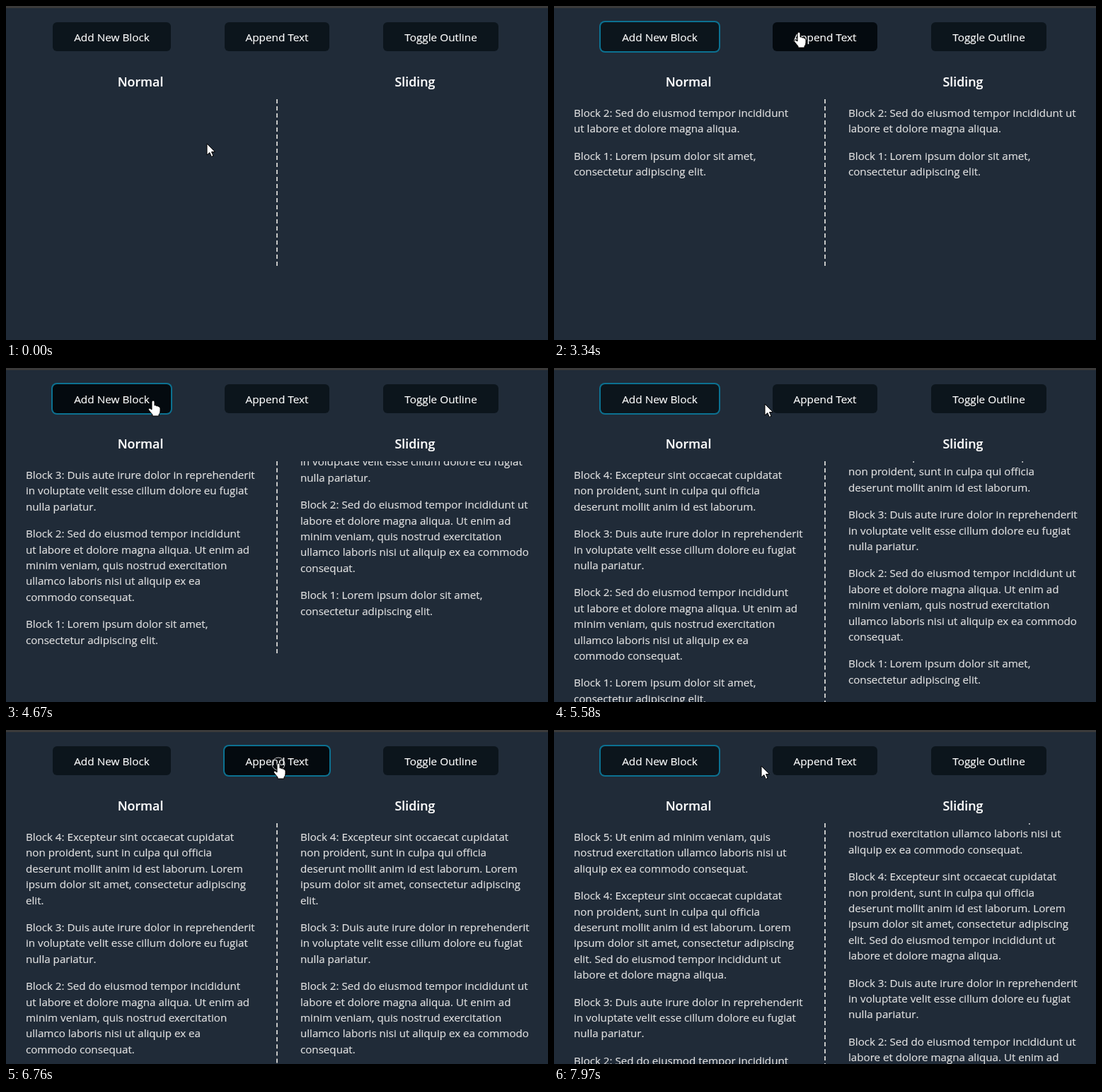
Write an HTML page that moves like this. It is 766x473 px and loops after 8000 ms.

```html
<!DOCTYPE html>
<html lang="en">
<head>
<meta charset="utf-8">
<title>Normal and sliding blocks</title>
<style>
  html, body { margin: 0; width: 100%; height: 100%; overflow: hidden; background: #202b38; }
  #stage {
    position: relative; width: 766px; height: 473px; overflow: hidden;
    background: #202b38; color: #e2e2e2;
    font: 15.15px/22.4px "Open Sans", "Noto Sans", sans-serif; white-space: nowrap;
    -webkit-text-stroke: 0.15px currentColor;
  }
  #stage > *, #inner { position: absolute; }
  .bar { top: 0; width: 100%; height: 3px; background: #3b3b3b; }
  .button {
    top: 23px; height: 41px; font-size: 15.35px; line-height: 42px; border-radius: 6px;
    background: #0c151c; color: #fff; text-align: center;
  }
  .button.hover { background: #040a0f; }
  .button.focus { box-shadow: 0 0 0 2px #0c7191; }
  .button.pressed { transform: translateY(2px); }
  h3 {
    top: 94px; width: 324px; margin: 0; text-align: center;
    font-size: 17.8px; font-weight: 600; line-height: 27px; color: #fff;
  }
  #normal {
    top: 132px; left: 0; width: 384px; min-height: 236px;
    box-sizing: border-box; padding-left: 28px; border-right: 2px dashed #c6c6c6;
  }
  #sliding { top: 132px; left: 416px; width: 350px; height: 341px; overflow: hidden; }
  p { margin: 0; padding: 8px 0; }
  #pointer { left: 0; top: 0; overflow: visible; }
  #pointer path { fill: #fff; stroke: #000; stroke-linejoin: round; }
</style>
</head>
<body>
<div id="stage">
  <div class="bar"></div>
  <div class="button" style="left:66px;width:167px">Add New Block</div>
  <div class="button" style="left:309px;width:148px">Append Text</div>
  <div class="button" style="left:533px;width:163px">Toggle Outline</div>
  <h3 style="left:28px">Normal</h3>
  <h3 style="left:416px">Sliding</h3>
  <div id="normal"></div>
  <div id="sliding"><div id="inner"></div></div>
  <svg id="pointer" width="1" height="1">
    <circle id="ring" r="9" fill="none" stroke="#ccc"/>
    <path id="arrow" d="M0 0V16L3.8 12.6L6.4 18.4L9 17.3L6.5 11.6H11.5Z"/>
    <g id="hand">
      <path d="M-2 1Q-2 -1 0 -1Q2 -1 2 1V6Q4 5 5 7Q7 6 8 8Q10 7.5 10 10V14
               Q10 17 8 19V21H-1V19L-6 13Q-7.5 11 -6 10Q-4.5 9.5 -2 12Z"/>
    </g>
  </svg>
</div>
<script>
const LOOP = 8000, LINE = 22.4, GAP = 16;
const SLIDE = 500, SLIDE_DELAY = 94, PRESS_DELAY = 60, HOLD = 120;
const ADD = 0, APPEND = 1;

// "/" breaks a line in both columns, "<" only on the left, ">" only on the right.
const clicks = [
  { at: 1550, button: ADD, text: "Lorem ipsum dolor sit amet,/consectetur adipiscing elit." },
  { at: 2500, button: ADD, text: "Sed do eiusmod tempor incididunt<ut>labore et dolore magna aliqua." },
  { at: 3480, button: APPEND, text: " Ut enim ad/minim veniam, quis nostrud exercitation/ullamco laboris nisi ut aliquip ex ea<commodo>consequat." },
  { at: 4325, button: ADD, text: "Duis aute irure dolor in reprehenderit/in voluptate velit esse cillum dolore eu fugiat/nulla pariatur." },
  { at: 5180, button: ADD, text: "Excepteur sint occaecat cupidatat/non proident, sunt in culpa qui officia/deserunt mollit anim id est laborum." },
  { at: 6020, button: APPEND, text: " Lorem/ipsum dolor sit amet, consectetur adipiscing/elit." },
  { at: 6760, button: APPEND, text: " Sed do eiusmod tempor incididunt ut/labore et dolore magna aliqua." },
  { at: 7570, button: ADD, text: "Ut enim ad minim veniam, quis/nostrud exercitation ullamco laboris nisi ut/aliquip ex ea commodo consequat." }
];

// time, x, y of the pointer
const path = [
  [0, 284, 195], [710, 284, 195], [900, 262, 158], [1160, 204, 74], [1370, 181, 44],
  [2860, 181, 44], [3100, 270, 38], [3280, 340, 37], [3340, 346, 38], [3450, 372, 46],
  [3980, 372, 46], [4290, 208, 47], [5370, 208, 47], [5580, 298, 51], [5720, 352, 50],
  [5870, 385, 48], [7230, 385, 48], [7510, 208, 47], [7770, 208, 47], [7970, 293, 51],
  [8000, 304, 51]
];

const $ = id => document.getElementById(id);
const buttons = [...document.querySelectorAll(".button")];
const boxes = buttons.map(b => ({ left: b.offsetLeft, right: b.offsetLeft + b.offsetWidth }));

function layout(blocks, breaks, spaces) {
  return blocks.map(text =>
    "<p>" + text.replace(spaces, " ").replace(breaks, "<br>") + "</p>").join("");
}

function heightOf(blocks) {
  const lines = blocks.join("").match(/[/<]/g) || [];
  return (lines.length + blocks.length) * LINE + blocks.length * GAP;
}

const stages = [{ left: "", right: "", height: 0 }];
let blocks = [];
for (const { button, text } of clicks) {
  blocks = button === ADD
    ? [`Block ${blocks.length + 1}: ${text}`, ...blocks]
    : [blocks[0] + text, ...blocks.slice(1)];
  stages.push({
    left: layout(blocks, /[/<]/g, />/g),
    right: layout(blocks, /[/>]/g, /</g),
    height: heightOf(blocks)
  });
}

const ease = x => 0.5 - 0.5 * Math.cos(Math.PI * Math.min(1, Math.max(0, x)));

function pointerAt(t) {
  const i = Math.max(1, path.findIndex(p => p[0] > t));
  const [a, b] = [path[i - 1], path[i]];
  const k = (t - a[0]) / (b[0] - a[0]);
  return [a[1] + (b[1] - a[1]) * k, a[2] + (b[2] - a[2]) * k];
}

let shown = -1;
function drawColumns(t) {
  const index = clicks.filter(c => c.at + SLIDE_DELAY <= t).length;
  const stage = stages[index];
  if (index !== shown) {
    shown = index;
    $("normal").innerHTML = stage.left;
    $("inner").innerHTML = stage.right;
    $("normal").style.height = stage.height + "px";
  }
  if (!index) return;
  const progress = ease((t - clicks[index - 1].at - SLIDE_DELAY) / SLIDE);
  $("inner").style.top = (progress - 1) * (stage.height - stages[index - 1].height) + "px";
}

function drawControls(t) {
  const [x, y] = pointerAt(t).map(Math.round);
  const hovered = boxes.findIndex(b => x >= b.left && x < b.right && y >= 23 && y < 64);
  const focusing = clicks.filter(c => c.at + PRESS_DELAY <= t).pop();
  const held = clicks.some(c => t >= c.at && t < c.at + HOLD);
  buttons.forEach((button, i) => {
    const focused = !!focusing && focusing.button === i;
    button.classList.toggle("hover", i === hovered);
    button.classList.toggle("focus", focused);
    button.classList.toggle("pressed", focused && t < focusing.at + HOLD);
  });
  $("pointer").style.transform = `translate(${x}px, ${y}px)`;
  $("arrow").style.display = hovered < 0 ? "" : "none";
  $("hand").style.display = hovered < 0 ? "none" : "";
  $("ring").style.display = held ? "" : "none";
}

const start = performance.now();
function frame() {
  const t = (performance.now() - start) % LOOP;
  drawColumns(t);
  drawControls(t);
  requestAnimationFrame(frame);
}
frame();
</script>
</body>
</html>
```
